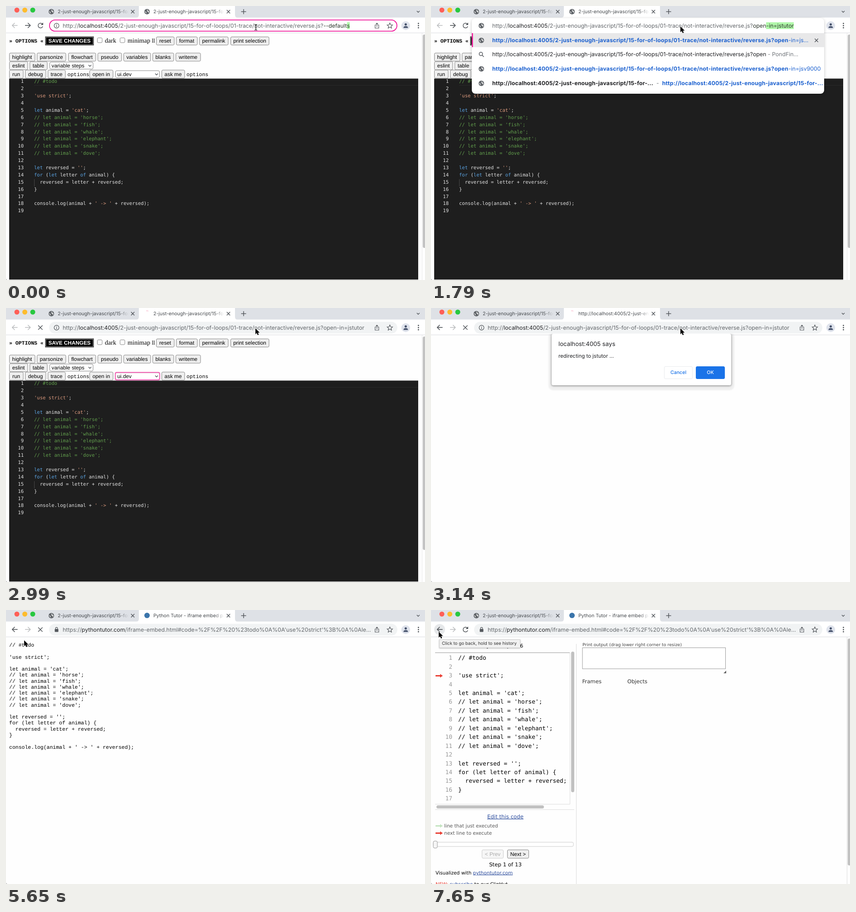
Animation of 924x606 px, one loop 8 s. Source, as an HTML page:

```html
<!DOCTYPE html>
<html lang="en">
<head>
<meta charset="utf-8">
<title>Opening a script in a visualizer</title>
<style>
html, body { margin: 0; width: 100%; height: 100%; overflow: hidden; background: #fff; }
#stage { position: relative; width: 924px; height: 606px; overflow: hidden; background: #aaa; font: 12.33px Inter, sans-serif; font-feature-settings: "calt" 0; text-rendering: geometricPrecision; white-space: pre; }
#stage > *, .row > svg, #dialog > * { position: absolute; }
svg { left: 0; top: 0; overflow: visible; }
pre { margin: 0; }
.ui { font: 11.76px "Liberation Sans", Arial, sans-serif; }
.mono { font: 11.47px "Liberation Mono", monospace; }
.serif { font: 14.1px "Liberation Serif", serif; }
.verdana { font: 10.58px "DejaVu Sans", sans-serif; }
.line { fill: none; stroke: #54585d; stroke-width: 1.5; }
.thin { stroke-width: 1.2; }
.btn { fill: #efefef; stroke: #767676; stroke-width: .9; }
.field { fill: #fff; stroke: #767676; stroke-width: .9; }
.link { fill: #2f4f9f; text-decoration: underline; }

.title { top: 4px; width: 156px; overflow: hidden; font-size: 10.58px; line-height: 17px; color: #45494d; -webkit-mask-image: linear-gradient(90deg, #000 86%, transparent); mask-image: linear-gradient(90deg, #000 86%, transparent); }
.url { left: 125px; top: 36px; line-height: 15px; color: #63676b; }
.url .host { color: #202124; }
.url [data-sel] { color: #2c352b; }

.nums { text-align: right; color: #8a8a8a; }
.editor { top: 160.3px; font: 10.57px/15.89px "DejaVu Sans Mono", monospace; color: #e4e4e4; }
.editor .c { color: #629f4d; } .editor .s { color: #dc9a7e; } .editor .k { color: #5ba3e2; }
#raw { left: 7px; top: 72px; font: 11.47px/13.27px "Liberation Mono", monospace; color: #000; }
.tutor { top: 97.3px; font: 12.83px/19.44px "DejaVu Sans Mono", monospace; color: #000; }
.tutor.nums { color: #999; }

#drop { left: 90px; top: 27px; width: 777px; height: 166.5px; border-radius: 8px; background: #fff; box-shadow: 0 2px 7px rgba(0,0,0,.22); overflow: hidden; }
#drop .url { position: absolute; left: 45px; top: 9px; }
#rows { position: absolute; top: 32.5px; width: 777px; }
.row { position: relative; height: 31.75px; line-height: 31.75px; padding-left: 45px; color: #202124; }
.row.blue { color: #1b60cf; }
.row b, .row [data-bold] { letter-spacing: .013em; }
.row i { font-style: normal; color: #70757a; }
.row.on { background: #e8e8e9; box-shadow: inset 2.5px 0 #f0189a; }

#veil { left: 200px; top: 57px; width: 524px; height: 160px; overflow: hidden; }
#dialog { position: absolute; left: 66px; top: 0; width: 396px; height: 114px; border-radius: 4px; background: #fff; box-shadow: 0 1px 4px rgba(0,0,0,.5), 0 4px 3px 7px rgba(0,0,0,.06); transform-origin: 50% 100%; color: #202124; }
#dialog .push { top: 72px; height: 26px; width: 61px; border: 1px solid #e8eaed; border-radius: 3px; font: 500 10.6px/26px Inter, sans-serif; text-align: center; color: #1a73e8; }
#tip { left: 18px; top: 65px; width: 177px; height: 17px; border: 1px solid #cfcfcf; background: #f1f1f1; box-shadow: 0 1px 3px rgba(0,0,0,.25); font-size: 9.75px; line-height: 17px; text-indent: 5px; color: #333; }
#spin { transform-origin: 311px 12px; animation: spin 1.2s linear infinite; }
@keyframes spin { to { transform: rotate(360deg); } }
</style>
</head>
<body>
<div id="stage">
<svg width="924" height="606">
  <defs>
    <g id="globe">
      <circle r="6" fill="#5f6368"/>
      <path d="M-4.6-1 L-1.5 1.5V4.6C-4-.1-5 1.5-4.6-1ZM-1-4.6 2-4.3 1.5-2.5-1-1.5 2 0 3.5 2.8 4.7.5 3.5-1.5Z" fill="#f4f4f4"/>
    </g>
    <path id="cross" class="line" d="M-3.7-3.7 3.7 3.7M3.7-3.7-3.7 3.7"/>
    <path id="chev" class="line" d="M-3-1.5 0 1.5 3-1.5"/>
    <path id="go" d="M0-1.5H10V-4L16 0 10 4V1.5H0Z"/>
    <path id="back" d="M25.5 43H14M19.3 37.5 13.8 43 19.3 48.5"/>
    <path id="fwd" d="M42 43H53.5M48.2 37.5 53.7 43 48.2 48.5"/>
  </defs>
  <path d="M0 0H924V606H4Q0 606 0 602Z" fill="#fefefe"/>

  <g id="editPage" data-t="0-3140">
    <path d="M7 160.5H909V605H7Z" fill="#1e1e1e"/>
    <path d="M62 161.5H909M62 175.5H909" stroke="#2a2a2a"/>
    <path d="M62.5 383V399" stroke="#484848"/>
    <path d="M917.5 60V606" stroke="#e8e8e8"/>
    <rect x="919" y="63" width="7" height="472" rx="3.5" fill="#c3c3c3"/>
    <rect x="86.5" y="67.5" width="107" height="19.5"/>
    <rect x="88" y="69" width="104" height="16.5" fill="none" stroke="#fff" stroke-width=".7"/>
    <text x="140" y="81.3" class="ui" style="font-weight:700" text-anchor="middle" fill="#fff">SAVE CHANGES</text>
    <g class="field"><rect x="201.5" y="70.5" width="10.5" height="10.5" rx="2"/><rect x="251.5" y="70.5" width="10.5" height="10.5" rx="2"/></g>
    <text x="7" y="81.3" class="mono" style="font-weight:700">» OPTIONS «</text>
    <g class="serif"><text x="218" y="81.3">dark</text><text x="268" y="81.3">minimap</text><text x="321.5" y="81" font-size="13">ll</text></g>
    <g class="mono"><text x="135.5" y="154.5">options</text><text x="398" y="154.5">options</text></g>
    <g class="field"><rect x="96.5" y="124" width="95.5" height="15.5" rx="3"/><rect x="241.5" y="143" width="97" height="15.5" rx="3"/></g>
    <g class="ui"><text x="100.5" y="136">variable steps</text><text x="245.5" y="154.8">ui.dev</text></g>
    <use href="#chev" x="185" y="132"/><use href="#chev" x="332" y="151"/>
    <rect data-t="2990-3140" x="241" y="142.5" width="98" height="16.5" rx="3" fill="none" stroke="#f55cb4" stroke-width="1.8"/>
  </g>

  <g id="tutorPage" data-t="6450-8000" class="verdana">
    <text x="163.5" y="83" text-anchor="middle" font-size="11">JavaScript ES6</text>
    <path d="M9 94.5H306" stroke="#999"/>
    <path d="M306.5 95V429.5H9M9 441.5H316M320.5 75V606M917.5 60V606" fill="none" stroke="#dcdcdc"/>
    <g fill="#c1c1c1"><rect x="309" y="92" width="7" height="311" rx="3.5"/><rect x="12" y="432" width="237" height="7" rx="3.5"/><rect x="919" y="63" width="7" height="502" rx="3.5"/></g>
    <g fill="#e93f34"><use href="#go" x="10" y="145.5"/><use href="#go" x="10" y="493.5"/></g>
    <use href="#go" x="10" y="477.5" fill="#c3e4c0"/>
    <text x="164" y="460.8" text-anchor="middle" font-size="11.76" class="link">Edit this code</text>
    <g fill="#555"><text x="29" y="481">line that just executed</text><text x="29" y="497.3">next line to execute</text></g>
    <rect x="5" y="513.5" width="309" height="9.5" rx="3" fill="#fff" stroke="#ccc"/>
    <rect x="5" y="511" width="9" height="15.5" rx="3" fill="#f6f6f6" stroke="#999"/>
    <rect x="112.5" y="530.5" width="47" height="18.5" rx="2.5" fill="#f6f6f6" stroke="#ccc"/>
    <rect x="168.5" y="530.5" width="47" height="18.5" rx="2.5" class="btn"/>
    <g class="ui" text-anchor="middle"><text x="136" y="543.8" fill="#aaa">&lt; Prev</text><text x="192" y="543.8">Next &gt;</text></g>
    <text x="164" y="566.5" text-anchor="middle" font-size="11.76">Step 1 of 13</text>
    <text x="10" y="584.5">Visualized with <tspan class="link">pythontutor.com</tspan></text>
    <text x="10" y="610"><tspan fill="#e93f34">NEW:</tspan> <tspan class="link">subscribe</tspan> to our ClipHut</text>
    <text x="334" y="79.5" font-size="9.48" fill="#444">Print output (drag lower right corner to resize)</text>
    <rect x="334" y="83.5" width="315.5" height="46.5" fill="#fff" stroke="#999"/>
    <path d="M651 134V140H645Z" fill="#666"/>
    <g font-size="11.7" fill="#333"><text x="333.5" y="161.5">Frames</text><text x="433" y="161.5">Objects</text></g>
  </g>

  <g id="browser">
    <path d="M0 0H924V26H0Z" fill="#dee1e6"/>
    <path d="M0 25.5H924V60H0Z" fill="#fff"/>
    <path d="M287 26Q293 26 293 19V0H505V19Q505 26 511 26Z" fill="#fff"/>
    <path d="M0 59.5H924" stroke="#dadce0"/>
    <circle cx="24" cy="9" r="5.5" fill="#ff5f57"/><circle cx="41.5" cy="9" r="5.5" fill="#febc2e"/><circle cx="59" cy="9" r="5.5" fill="#28c840"/>
    <use href="#globe" x="100" y="12.5"/>
    <use href="#cross" x="279.5" y="12.5"/><use href="#cross" x="490.5" y="12.5"/>
    <path class="line" d="M518.5 12.5H529.5M524 7V18"/>
    <use href="#chev" x="909" y="12.5"/>
    <use href="#globe" x="311" y="12.5" data-t="0-2690"/>
    <path data-t="2690-4790" d="M309 6.5Q311 5.5 314 7" fill="none" stroke="#f9b9cd" stroke-width="1.2"/>
    <g data-t="4790-5390"><circle id="spin" cx="311" cy="12" r="6" fill="none" stroke="#f0369f" stroke-width="1.9" stroke-dasharray="29 9"/></g>
    <circle data-t="5390-8000" cx="311" cy="12" r="6" fill="#3b75ab"/>

    <circle data-t="6150-8000" cx="19" cy="43" r="12" fill="#e6e8ea"/>
    <g class="line" style="stroke:#babcbe"><use href="#back"/><use href="#fwd"/></g>
    <g class="line"><use href="#fwd" data-t="0-2840"/><use href="#back" data-t="3140-8000"/></g>
    <g data-t="0-2690 6150-8000"><path class="line" d="M80.5 40.5A5.2 5.2 0 1 0 81 45"/><path d="M82 36.5V42H76.5Z" fill="#54585d"/></g>
    <path data-t="2690-6150" class="line" d="M71 38.5 80.5 48M80.5 38.5 71 48"/>
    <rect x="95" y="30.5" width="768" height="26" rx="13" fill="#f1f3f4"/>
    <rect data-t="0-2690" x="95.9" y="30.9" width="766.2" height="24.7" rx="12.3" fill="#fff" stroke="#f0189a" stroke-width="1.8"/>
    <g data-t="0-5390"><circle cx="111.5" cy="43.5" r="5.3" class="line thin"/><path d="M111.5 42.5V46.5M111.5 40V41.3" stroke="#54585d" stroke-width="1.3"/></g>
    <g data-t="5390-8000"><rect x="107.5" y="42" width="8" height="6.5" rx="1" fill="#54585d"/><path class="line thin" d="M109.3 42V40.5a2.2 2.2 0 0 1 4.4 0V42"/></g>
    <path class="line thin" d="M816 42H814V49H822V42H820M818 46V38M815.5 40.3 818 37.8 820.5 40.3"/>
    <path class="line thin" d="M846.5 37.5 848.2 41.5 852.5 41.9 849.2 44.7 850.2 49 846.5 46.7 842.8 49 843.8 44.7 840.5 41.9 844.8 41.5Z"/>
    <circle cx="881.5" cy="43.5" r="9.7" fill="#dfe3ec"/>
    <g fill="#44506a"><circle cx="881.5" cy="40.8" r="2.5"/><path d="M876.5 48.5Q876.5 44.5 881.5 44.5T886.5 48.5Z"/></g>
    <g fill="#54585d"><circle cx="909.5" cy="38.5" r="1.5"/><circle cx="909.5" cy="43.3" r="1.5"/><circle cx="909.5" cy="48" r="1.5"/></g>
  </g>
</svg>

<pre class="editor nums" data-t="0-3140" style="right:885px"></pre>
<pre class="editor code" data-t="0-3140" style="left:62px"></pre>
<pre id="raw" data-t="4790-6150"></pre>
<pre class="tutor nums" data-t="6450-8000" style="right:877px"></pre>
<pre class="tutor code" data-t="6450-8000" style="left:60px"></pre>

<div class="title" style="left:114px">2-just-enough-javascript/15-for-of</div>
<div class="title" style="left:325px" data-t="0-3140">2-just-enough-javascript/15-for-of</div>
<div class="title" style="left:325px" data-t="3140-5390">http://localhost:4005/2-just-enough</div>
<div class="title" style="left:325px" data-t="5390-8000">Python Tutor - iframe embed page</div>

<div class="url" data-t="0-1350"><span class="base"></span><span data-sel="750-8000">-</span><span data-sel="450-8000">-</span><span data-sel="150-8000">default</span><span data-sel="0-8000">s</span></div>
<div class="url" data-t="2690-5390"><span class="base"></span>open-in=jstutor</div>
<div class="url" data-t="5390-8000">https://<span class="host">pythontutor.com</span>/iframe-embed.html#code=%2F%2F%20%23todo%0A%0A'use%20strict'%3B%0A%0Ale...</div>

<div id="drop" data-t="1350-2690">
  <svg width="1" height="1" style="position:absolute"><use href="#globe" x="21" y="16.5"/></svg>
  <div class="url"><span class="base"></span><span class="typed" data-kind="sel"></span><span data-sel="0-8000">-in=jstutor</span></div>
  <div id="rows"><div class="row blue on"><svg width="1" height="1"><use href="#globe" x="21" y="16"/><use href="#cross" x="760" y="16"/></svg><b class="base"></b><span class="typed" data-kind="bold"></span>-in=js...</div><div class="row"><svg width="1" height="1"><circle class="line" cx="20" cy="15" r="3.7"/><path class="line" d="M22.7 17.7 26.5 21.5"/></svg><span class="base"></span>open<i> - PondFin...</i></div><div class="row blue"><svg width="1" height="1"><use href="#globe" x="21" y="16"/></svg><b class="base"></b><span class="typed" data-kind="bold"></span>-in=jsv9000</div><div class="row blue"><svg width="1" height="1"><use href="#globe" x="21" y="16"/></svg><b style="color:#202124">http://localhost:4005/2-just-enough-javascript/15-for-...</b><i>  -  </i><b>http://localhost:4005/2-just-enough-javascript/15-for-...</b></div></div>
</div>

<div id="veil" data-t="3140-5090">
  <div id="dialog">
    <div style="left:15px;top:14px;font-size:13.2px;line-height:18px">localhost:4005 says</div>
    <div style="left:15px;top:41px;font-size:11.45px;line-height:17px">redirecting to jstutor ...</div>
    <div class="push" style="left:248px">Cancel</div>
    <div class="push" style="left:318px;width:62px;background:#1a73e8;border-color:#1a73e8;color:#fff">OK</div>
  </div>
</div>

<div id="tip" data-t="7650-8000">Click to go back, hold to see history</div>

<svg data-t="0-1350" width="1" height="1"><path d="M548 40.5Q551 40.5 551 43V51Q551 53.5 548 53.5M554 40.5Q551 40.5 551 43V51Q551 53.5 554 53.5M549.5 48.5H552.5" fill="none" stroke="#222" stroke-width="1.2"/></svg>
<svg id="arrow" data-t="1350-8000" width="1" height="1"><path d="M0 0V13L3 10.3 5 15 7.4 14 5.4 9.4H9.4Z" stroke="#fff" stroke-width="1.3" paint-order="stroke"/></svg>
</div>

<script>
const LOOP = 8000;
const BASE = '<span>http://</span><span class="host">localhost:4005</span>/2-just-enough-javascript/15-for-of-loops/01-trace/not-interactive/reverse.js?';
const CODE = `// #todo

'use strict';

let animal = 'cat';
// let animal = 'horse';
// let animal = 'fish';
// let animal = 'whale';
// let animal = 'elephant';
// let animal = 'snake';
// let animal = 'dove';

let reversed = '';
for (let letter of animal) {
  reversed = letter + reversed;
}

console.log(animal + ' -> ' + reversed);
`;
const KEYS = [1350, 1500, 1640, 1790];
const $ = s => document.querySelector(s);
const all = (s, fn) => document.querySelectorAll(s).forEach(fn);

// Static content
const count = n => Array.from({ length: n }, (_, i) => i + 1).join('\n');
const paint = src => src.replace(/\/\/.*|'[^'\n]*'|\b(?:let|for|of)\b/g, m =>
  `<span class="${m[0] === '/' ? 'c' : m[0] === "'" ? 's' : 'k'}">${m.replace('>', '&gt;')}</span>`);

$('.editor.nums').textContent = count(19);
$('.editor.code').innerHTML = paint(CODE);
$('#raw').textContent = CODE;
$('.tutor.nums').textContent = count(17);
$('.tutor.code').textContent = CODE.split('\n').slice(0, 17).join('\n');
all('.base', el => el.innerHTML = BASE);
all('.typed', el => el.innerHTML = [...'open'].map((c, i) =>
  `<span data-${el.dataset.kind}="${el.dataset.kind === 'sel' ? '0-' + KEYS[i] : KEYS[i] + '-' + LOOP}">${c}</span>`).join(''));

const buttons = [
  [77.3, 'reset', 331, 40, 'format', 375, 47, 'permalink', 426, 64, 'print selection', 495, 85],
  [113, 'highlight', 7, 57, 'parsonize', 68, 64, 'flowchart', 137, 61, 'pseudo', 202, 53, 'variables', 259, 60, 'blanks', 323, 47, 'writeme', 374, 55],
  [132, 'eslint', 7, 41, 'table', 52, 39],
  [150.7, 'run', 7, 31, 'debug', 42, 46, 'trace', 92, 39, 'open in', 184, 52, 'ask me', 343, 51]
];
let markup = '';
for (const [y, ...items] of buttons)
  for (let i = 0; i < items.length; i += 3) {
    const [label, x, w] = items.slice(i, i + 3);
    markup += `<rect class="btn" x="${x + .5}" y="${y - 9}" width="${w - .5}" height="18" rx="2.5"/>
      <text class="ui" x="${x + w / 2}" y="${y + 4}" text-anchor="middle">${label}</text>`;
  }
$('#editPage').insertAdjacentHTML('beforeend', markup);

// Timeline: each entry holds its style until the next one
const play = (el, steps) => el.animate(
  steps.map(([t, style]) => ({ offset: t / LOOP, easing: 'step-end', ...style })),
  { duration: LOOP, iterations: Infinity });

const during = (key, on, off) => all(`[data-${key}]`, el => play(el, [[0, off],
  ...el.dataset[key].split(' ').flatMap(span => {
    const [a, b] = span.split('-').map(Number);
    return [[a, on], [b, off]];
  })]));

during('t', { visibility: 'visible' }, { visibility: 'hidden' });
during('sel', { backgroundColor: '#b1f8aa' }, { backgroundColor: 'transparent' });
during('bold', { fontWeight: 700 }, { fontWeight: 400 });

const tilt = (dy, sy, deg) => `translateY(${dy}px) scaleY(${sy}) perspective(150px) rotateX(${deg}deg)`;
play($('#dialog'), [
  [0, { opacity: 1, transform: tilt(0, 1, 0) }],
  [4790, { opacity: .8, transform: tilt(-3, 1.02, 1) }],
  [4940, { opacity: .22, transform: tilt(-11, 1.075, 3.84) }]
]);

const path = [
  [0, 550, 45], [3290, 552, 49], [3440, 560, 64], [3590, 574, 88], [3730, 590, 113],
  [3900, 604, 132], [4050, 612, 142], [4200, 616, 146], [5090, 590, 140], [5240, 380, 104],
  [5390, 170, 80], [5500, 75, 70], [5650, 40, 67], [5860, 25, 54], [6000, 17, 48]
];
play($('#arrow'), path.map(([t, x, y]) => [t, { transform: `translate(${x}px, ${y}px)` }]));
</script>
</body>
</html>
```
